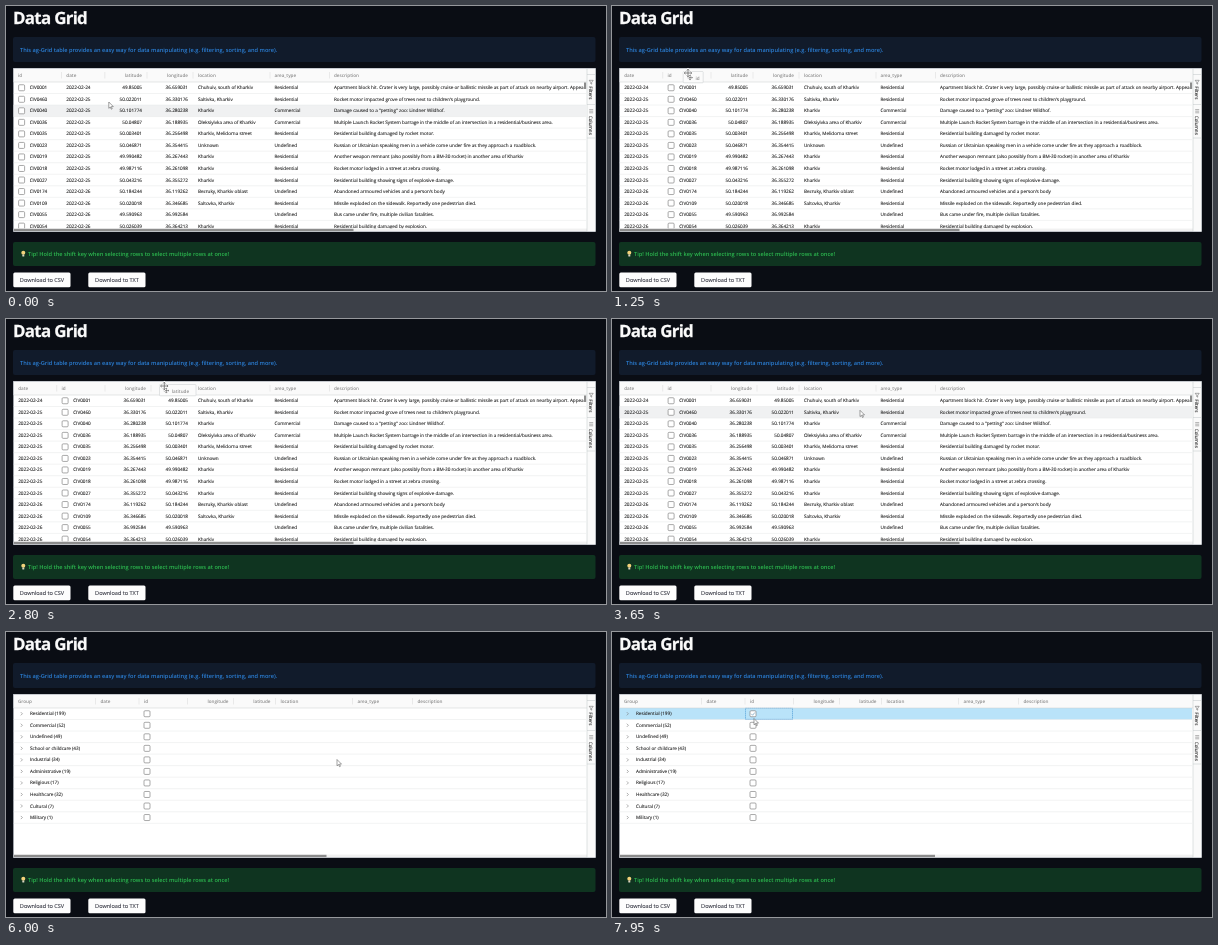
Animation, 600 px wide and 285 px high, one loop 8000 ms. Source, as an HTML page:

```html
<!DOCTYPE html>
<html lang="en">
<head>
<meta charset="utf-8">
<title>Data Grid</title>
<style>
html, body { margin: 0; width: 100%; height: 100%; overflow: hidden; background: #0a0d14; }
svg { display: block; width: 100vw; height: 100vh; }
text { font-family: "Open Sans", "Noto Sans", sans-serif; text-rendering: geometricPrecision; white-space: pre; }
.title { font-size: 16.9px; font-weight: 700; letter-spacing: -.7px; fill: #fafafa; stroke: #fafafa; stroke-width: .25px; }
.note { font-size: 5.64px; font-weight: 600; }
.btn { font-size: 5.55px; fill: #31333f; stroke: #31333f; stroke-width: .1px; }
.cell { font-size: 4.64px; fill: #2b2b2b; stroke: #2b2b2b; stroke-width: .12px; }
.head { font-size: 4.6px; font-weight: 600; fill: #8b8b8b; }
</style>
</head>
<body>
<svg id="stage" viewBox="0 0 600 285" preserveAspectRatio="none"></svg>
<script>
const LOOP = 8000, TOP = 76, ROW = 11.53, PAD = 5;
const svg = document.getElementById("stage");

function el(parent, tag, attrs = {}, text) {
  const node = document.createElementNS("http://www.w3.org/2000/svg", tag);
  for (const key in attrs) node.setAttribute(key, attrs[key]);
  if (text !== undefined) node.textContent = text;
  parent.appendChild(node);
  return node;
}
const rect = (p, x, y, width, height, fill, more) => el(p, "rect", { x, y, width, height, fill, ...more });
const line = (p, d, stroke, width = .5, more) =>
  el(p, "path", { d, stroke, "stroke-width": width, fill: "none", ...more });
const label = (p, x, y, text, cls, more) => el(p, "text", { x, y, class: cls, ...more }, text);
const group = (p, attrs) => el(p, "g", attrs);
const show = (node, on) => node.setAttribute("display", on ? "inline" : "none");
const move = (node, x, y = 0) => node.setAttribute("transform", `translate(${x} ${y})`);
const mid = row => TOP + ROW * (row + .5);

const columns = { date: 43.5, id: 48.5, longitude: 46, latitude: 42, location: 77, area_type: 60, description: 270 };
const records = `CIV0001|2022-02-24|49.85005|36.659031|Chuhuiv, south of Kharkiv|Residential|Apartment block hit. Crater is very large, possibly cruise or ballistic missile as part of attack on nearby airport. Appears
CIV0460|2022-02-25|50.022011|36.330176|Saltivka, Kharkiv|Residential|Rocket motor impacted grove of trees next to children's playground.
CIV0040|2022-02-25|50.101774|36.280238|Kharkiv|Commercial|Damage caused to a "petting" zoo: Lindner Wildhof.
CIV0036|2022-02-25|50.04807|36.188935|Oleksiyivka area of Kharkiv|Commercial|Multiple Launch Rocket System barrage in the middle of an intersection in a residential/business area.
CIV0035|2022-02-25|50.003401|36.256498|Kharkiv, Melidorna street|Residential|Residential building damaged by rocket motor.
CIV0023|2022-02-25|50.046871|36.354415|Unknown|Undefined|Russian or Ukrainian speaking men in a vehicle come under fire as they approach a roadblock.
CIV0019|2022-02-25|49.990482|36.267443|Kharkiv|Residential|Another weapon remnant (also possibly from a BM-30 rocket) in another area of Kharkiv
CIV0018|2022-02-25|49.987116|36.261098|Kharkiv|Residential|Rocket motor lodged in a street at zebra crossing.
CIV0027|2022-02-25|50.043216|36.355272|Kharkiv|Residential|Residential building showing signs of explosive damage.
CIV0174|2022-02-26|50.184244|36.119262|Bezruky, Kharkiv oblast|Undefined|Abandoned armoured vehicles and a person's body
CIV0109|2022-02-26|50.020018|36.346685|Saltovka, Kharkiv|Residential|Missile exploded on the sidewalk. Reportedly one pedestrian died.
CIV0055|2022-02-26|49.590963|36.992584||Undefined|Bus came under fire, multiple civilian fatalities.
CIV0054|2022-02-26|50.026039|36.364213|Kharkiv|Residential|Residential building damaged by explosion.`.split("\n").map(s => s.split("|"));
const fields = ["id", "date", "latitude", "longitude", "location", "area_type", "description"];
const groups = ["Residential (199)", "Commercial (52)", "Undefined (49)", "School or childcare (43)", "Industrial (34)",
  "Administrative (19)", "Religious (17)", "Healthcare (32)", "Cultural (7)", "Military (1)"];

// Page around the table
rect(svg, 0, 0, 600, 285, "#0a0d14");
label(svg, 7, 18, "Data Grid", "title");
rect(svg, 7, 31, 582.5, 25, "#111b2b", { rx: 2 });
label(svg, 14, 45.8, "This ag-Grid table provides an easy way for data manipulating (e.g. filtering, sorting, and more).", "note", { fill: "#2b80d8" });
rect(svg, 7, 236, 582.5, 24, "#0f3420", { rx: 2 });
el(svg, "circle", { cx: 17.3, cy: 246.7, r: 2, fill: "#f3d27a" });
rect(svg, 16.3, 248.4, 2, 2.2, "#d8d3c0", { rx: .5 });
label(svg, 22, 250, "Tip! Hold the shift key when selecting rows to select multiple rows at once!", "note", { fill: "#2cb84f" });
[["CSV", 7], ["TXT", 82]].forEach(([kind, x]) => {
  rect(svg, x + .3, 266.6, 57.2, 14.6, "#fdfdfd", { rx: 1.5 });
  label(svg, x + 29, 275.9, "Download to " + kind, "btn", { "text-anchor": "middle" });
});

// Table
rect(svg, 7.5, 62.4, 582, 163.2, "#fff");
rect(svg, 7.5, 62.4, 573.5, 13.6, "#fafafa");
const clip = el(el(svg, "defs"), "clipPath", { id: "body" });
rect(clip, 7.5, 62.4, 572.5, 160.1, "#000");
const table = group(svg, { "clip-path": "url(#body)" });
const highlight = rect(table, 7, 0, 573, ROW, "#f0f1f2");

function rules(parent, count) {
  for (let i = 1; i <= count; i++) line(parent, `M7 ${TOP + ROW * i}H580`, "#e4e6e7");
}
function checkbox(parent, x, row) {
  return rect(parent, x, mid(row) - 3, 6, 6, "#fff", { rx: 1, stroke: "#858585", "stroke-width": .7 });
}
function heading(parent, name, width) {
  const right = /itude$/.test(name);
  label(parent, right ? width - PAD : PAD, 70.9, name, "head", { "text-anchor": right ? "end" : "start" });
  line(parent, `M${width} 66V72.5`, "#d8d8d8");
}

const flat = group(table);
rules(flat, 13);
const cols = {};
for (const name in columns) {
  const col = cols[name] = group(flat), width = columns[name], k = fields.indexOf(name);
  const right = /itude$/.test(name);
  heading(col, name, width);
  records.forEach((record, row) => {
    if (name === "id") checkbox(col, PAD + .6, row);
    const x = name === "id" ? 16.7 : right ? width - PAD : PAD;
    label(col, x, mid(row) + 1.5, record[k], "cell", { "text-anchor": right ? "end" : "start" });
  });
}

const grouped = group(table);
rules(grouped, groups.length);
heading(group(grouped, { transform: "translate(7)" }), "Group", 82.5);
let left = 89.5;
for (const name in columns) {
  heading(group(grouped, { transform: `translate(${left})` }), name, columns[name]);
  left += columns[name];
}
groups.forEach((name, row) => {
  const y = mid(row);
  line(grouped, `M14.8 ${y - 1.6}l1.6 1.6l-1.6 1.6`, "#777", .6);
  label(grouped, 24, y + 1.5, name, "cell");
  checkbox(grouped, 138, row);
});
const picked = group(grouped);
rect(picked, 133.5, TOP + .2, 47, ROW - .4, "none", { stroke: "#3f92d2", "stroke-width": .7, "stroke-dasharray": "1.2 .8" });
line(picked, `M139.2 ${mid(0)}l1.4 1.5l2.3-2.8`, "#6c9dbb", .7);

line(svg, "M7.5 76H581", "#c9cccf");
rect(svg, 7.5, 222.6, 573.5, 2.9, "#f1f1f1");
const thumb = rect(svg, 7.5, 222.8, 340, 2.3, "#8c8c8c");
const vThumb = rect(svg, 578, 76.5, 2.2, 6.5, "#8c8c8c");

// Side bar
rect(svg, 581, 62.4, 8.5, 163.2, "#fafafa");
line(svg, "M581 62.4V225.6M581 68.5H589.5M581 98.5H589.5M581 132H589.5", "#bfc4c7");
line(svg, "M583.2 74.3H587.2L585.7 76.3V78.2L584.7 77.6V76.3Z", "#555");
line(svg, "M583.2 103.6H587.2M583.2 105.2H587.2M583.2 106.8H587.2", "#666");
[["Filters", 80.3], ["Columns", 109.8]].forEach(([name, y]) =>
  label(svg, 0, 0, name, "cell", { transform: `translate(583.4 ${y}) rotate(90)` }));
rect(svg, 7.5, 62.4, 582, 163.2, "none", { stroke: "#babfc7", "stroke-width": .5 });

// Column menu
const menu = group(svg);
[3, 2, 1].forEach(n => rect(menu, 308 - n * .6, 63.5, 91 + n * 1.4, 84 + n * .8, "#000", { opacity: .1, rx: 1.5 }));
rect(menu, 308, 63, 91, 84, "#fff", { stroke: "#bcc2c6", "stroke-width": .5, rx: 1 });
rect(menu, 308.3, 63.3, 90.4, 12.5, "#f7f7f7");
rect(menu, 308.3, 63.3, 17, 12.7, "#fff");
line(menu, "M325.5 63.2V75.9H398.8", "#ccd0d2");
line(menu, "M315 67.9H319.4M315 69.5H319.4M315 71.1H319.4", "#777", .6);
line(menu, "M332.2 67.6H336.8L335 69.7V72L334 71.3V69.7Z", "#777", .6);
line(menu, "M349.2 67.9H353.8V71.3H349.2ZM350.7 67.9V71.3M352.3 67.9V71.3", "#aaa");
line(menu, "M312 85.8L314 83.8M313 82L315.8 84.8M313.6 82.5L315.2 80.8L317 82.6L315.4 84.2", "#555", .7);
line(menu, "M390.4 81.4L392 83L390.4 84.6", "#666", .6);
line(menu, "M312.2 122.5H317.2V127.5H312.2ZM313.5 124.2H316M313.5 125.8H316", "#444", .7);
line(menu, "M308.3 90.5H398.7M308.3 117.2H398.7M308.3 132.8H398.7", "#dcdfe1");
[["Pin Column", 84.7], ["Autosize This Column", 100], ["Autosize All Columns", 111.5],
  ["Group by area_type", 126.7], ["Reset Columns", 142]]
  .forEach(([name, y]) => label(menu, 322, y, name, "cell"));

// Pointer and drag ghost
const cross = "M0-3.6V3.6M-3.6 0H3.6M-1.1-2.6L0-3.8L1.1-2.6M-1.1 2.6L0 3.8L1.1 2.6M-2.6-1.1L-3.8 0L-2.6 1.1M2.6-1.1L3.8 0L2.6 1.1";
const ghost = group(svg);
const ghostBox = rect(ghost, -4.8, -1.5, 20, 11.3, "#fbfbfb", { stroke: "#c6cacd", "stroke-width": .5, rx: .8 });
line(ghost, cross, "#555", .9, { transform: "translate(2 4.6) scale(.65)" });
const ghostText = label(ghost, 7.5, 6.8, "", "head");
const hand = group(svg);
line(hand, cross, "#fff", 1.8);
line(hand, cross, "#666", .8);
const arrow = el(svg, "path", { d: "M0 0V6.3L1.5 5L2.5 7.2L3.4 6.8L2.5 4.6H4.5Z", fill: "#fff", stroke: "#444", "stroke-width": .5 });

// Pointer stops: time, x, y
const path = [[0, 102.8, 96], [300, 102.8, 96], [700, 22, 68], [800, 22, 68], [1200, 76, 67], [1400, 76, 67],
  [1950, 122, 69], [2200, 122, 69], [2780, 158.3, 67], [2880, 158.3, 67], [3640, 248, 91.3], [3750, 248, 91.3],
  [4550, 316, 69], [5180, 316, 69], [5290, 321.5, 77], [5350, 321.5, 77], [5700, 331, 124], [5850, 331, 124],
  [5980, 331, 127.5], [6350, 331, 127.5], [7150, 158, 92], [7200, 158, 92], [7600, 142, 86.5], [LOOP, 142, 86.5]];

const ease = (t, from, to) => {
  const u = Math.min(1, Math.max(0, (t - from) / (to - from)));
  return u * u * (3 - 2 * u);
};
const mix = (a, b, u) => a + (b - a) * u;

function pointerAt(t) {
  const i = Math.max(1, path.findIndex(stop => stop[0] > t));
  const [t0, x0, y0] = path[i - 1], [t1, x1, y1] = path[i];
  const u = ease(t, t0, t1);
  return [mix(x0, x1, u), mix(y0, y1, u)];
}

function draw(t) {
  const [x, y] = pointerAt(t);
  const isGrouped = t >= 5850, isPicked = t >= 7800, isMenu = t >= 4800 && t < 5800;
  const dragged = t >= 800 && t < 1400 ? "id" : t >= 2200 && t < 2880 ? "latitude" : "";

  const first = ease(t, 980, 1180), second = ease(t, 2420, 2620);
  move(cols.id, mix(7, 50.5, first));
  move(cols.date, mix(55.3, 7.2, first));
  move(cols.latitude, mix(99, 145, second));
  move(cols.longitude, mix(141, 99, second));
  move(cols.location, 187);
  move(cols.area_type, 263.5);
  move(cols.description, 323);

  show(flat, !isGrouped);
  show(grouped, isGrouped);
  show(picked, isPicked);
  show(menu, isMenu);
  show(vThumb, !isGrouped);
  thumb.setAttribute("width", isPicked ? 315.5 : isGrouped ? 313 : 340);

  const row = isPicked ? 0 : Math.floor((y + (isGrouped ? 0 : 3.2) - TOP) / ROW);
  const hover = !dragged && !isMenu && row >= 0 && !(t >= 5800 && t < 6350);
  show(highlight, hover || isPicked);
  highlight.setAttribute("y", TOP + row * ROW);
  highlight.setAttribute("fill", isPicked ? "#b9e3f9" : "#f0f1f2");

  show(ghost, dragged);
  show(hand, dragged);
  show(arrow, !dragged);
  ghostText.textContent = dragged;
  ghostBox.setAttribute("width", dragged === "id" ? 20 : 36.5);
  [ghost, hand, arrow].forEach(node => move(node, x, y));
}

function tick(now) {
  draw(now % LOOP);
  requestAnimationFrame(tick);
}
draw(0);
requestAnimationFrame(tick);
</script>
</body>
</html>
```
